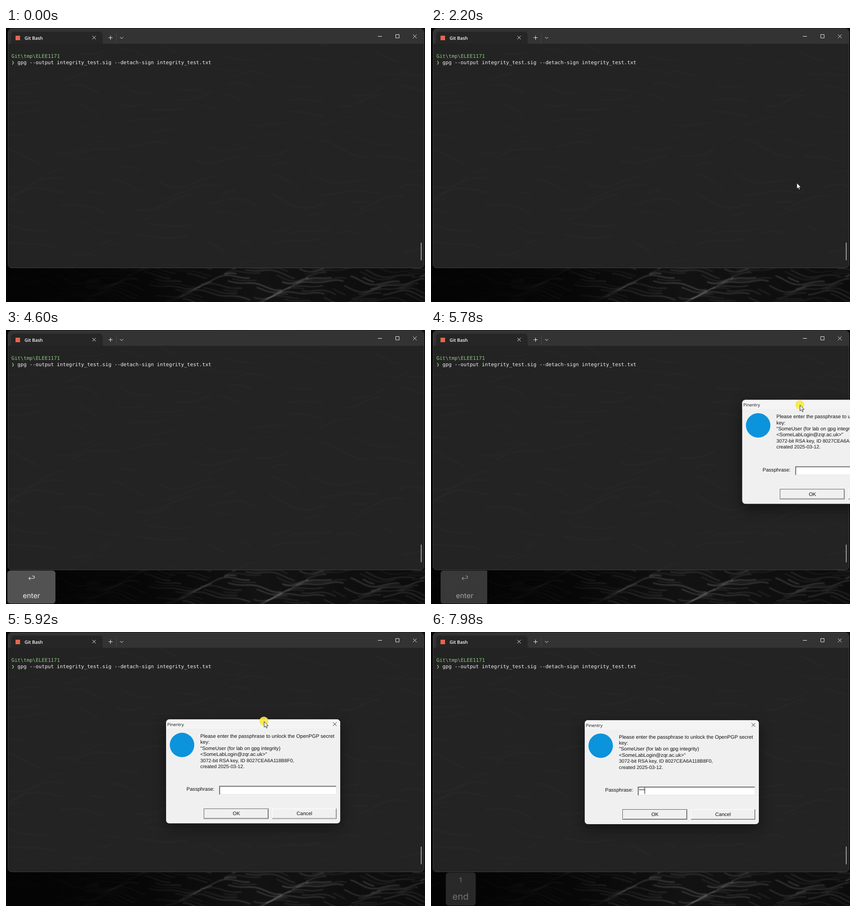
An HTML page for the animation above (8000 ms loop, 924 by 606 pixels).

```html
<!DOCTYPE html>
<html lang="en">
<head>
<meta charset="utf-8">
<title>Signing a file</title>
<style>
  html, body { margin: 0; width: 100%; height: 100%; overflow: hidden; background: #000; }
  svg { display: block; width: 100%; height: 100%; }
  text { white-space: pre; text-rendering: geometricPrecision; }
  .mono { font: 11.1px "DejaVu Sans Mono", monospace; }
  .ui { font-family: "Open Sans", sans-serif; }
  .form { font-family: "Liberation Sans", sans-serif; font-size: 11.1px; fill: #111; }
  .key { font-family: Inter, sans-serif; fill: #f0f0f0; text-anchor: middle; }
  .icon { fill: none; stroke: #f2f2f2; }
  #dialog { filter: drop-shadow(0 10px 14px rgba(0, 0, 0, .45)); }
</style>
</head>
<body>
<svg viewBox="0 0 924 606" xmlns="http://www.w3.org/2000/svg">
  <defs>
    <linearGradient id="sea">
      <stop offset="0" stop-color="#030303"/>
      <stop offset=".35" stop-color="#070707"/>
      <stop offset=".6" stop-color="#121212"/>
      <stop offset="1" stop-color="#0c0c0c"/>
    </linearGradient>
    <linearGradient id="foam" gradientUnits="userSpaceOnUse" x1="0" y1="0" x2="924" y2="0">
      <stop offset=".1" stop-color="#fff" stop-opacity=".05"/>
      <stop offset=".35" stop-color="#fff" stop-opacity=".25"/>
      <stop offset=".6" stop-color="#fff"/>
      <stop offset="1" stop-color="#fff" stop-opacity=".7"/>
    </linearGradient>
    <filter id="soft" filterUnits="userSpaceOnUse" x="0" y="0" width="924" height="606">
      <feGaussianBlur stdDeviation="1.1"/>
    </filter>
    <clipPath id="pane"><rect x="5" y="36" width="916" height="494" rx="6"/></clipPath>
    <clipPath id="enterClip"><rect x="0" y="531" width="124" height="75"/></clipPath>
    <clipPath id="endClip"><rect x="0" y="531" width="99" height="75"/></clipPath>
  </defs>

  <rect width="924" height="606" fill="url(#sea)"/>
  <g id="waves" fill="none" stroke="url(#foam)" filter="url(#soft)"/>

  <rect x="4.5" y="1.5" width="917" height="529" rx="7.5" fill="#232323" stroke="#404040"/>
  <path d="M5 35V9a7 7 0 0 1 7-7H914a7 7 0 0 1 7 7V35Z" fill="#333"/>
  <path d="M7 35q4 0 4-4V15a7 7 0 0 1 7-7H206a7 7 0 0 1 7 7V31q0 4 4 4Z" fill="#262626"/>
  <g clip-path="url(#pane)">
    <g id="haze" fill="none" stroke="#fff" filter="url(#soft)"/>
  </g>

  <rect x="21" y="17" width="10" height="10" fill="#e8654f"/>
  <text class="ui" x="41" y="25.7" font-size="10" font-weight="600" fill="#fff">Git Bash</text>
  <path class="icon" d="M190.500 17.500l7.500 7.500m0-7.500l-7.500 7.500M226 21.500h9M230.500 17v9M251.500 20l3.500 3.500l3.500-3.500"/>
  <path d="M243.500 11V32" stroke="#484848"/>
  <path class="icon" d="M820 18.500h9M859.500 14.500h7.500v7.500h-7.500zM897.500 14.500l8 8m0-8l-8 8"/>

  <text class="mono" x="12" y="66" fill="#8fc97f">Git\tmp\ELEE1171</text>
  <text class="mono" x="12" y="79.500" fill="#8fc97f">❯</text>
  <text class="mono" x="25.300" y="79.500" fill="#f2f2f2">gpg --output integrity_test.sig --detach-sign integrity_test.txt</text>
  <rect id="termCaret" width="1" height="14" fill="#eee"/>
  <rect id="thumb" y="474.500" height="39.500" rx="1" fill="#b4b4b4"/>

  <g id="dialog">
    <rect width="384" height="230" rx="7" fill="#f0f0f0"/>
    <path d="M0 21V7a7 7 0 0 1 7-7H377a7 7 0 0 1 7 7V21Z" fill="#f4f4f4"/>
    <text class="ui" x="2.500" y="14.500" font-size="9.400" fill="#111">Pinentry</text>
    <path d="M368 6.500l8 8m0-8l-8 8" stroke="#222" fill="none"/>
    <circle cx="35.200" cy="56.500" r="27" fill="#0b93dc"/>
    <g id="message" class="form"></g>
    <text class="form" x="45" y="158" font-size="11.400">Passphrase:</text>
    <rect x="117" y="147" width="258" height="19" fill="#fff"/>
    <path d="M118 166V148H375" fill="none" stroke="#6c6c6c" stroke-width="2"/>
    <path d="M119 165.500H375.500V148" fill="none" stroke="#e2e2e2"/>
    <text id="stars" class="form" x="120" y="159" style="font-size:10.300px"></text>
    <rect id="fieldCaret" y="149" width="1" height="14" fill="#000"/>
    <rect x="83.500" y="197.500" width="142" height="22" fill="#f0f0f0" stroke="#5c5c5c"/>
    <path d="M85 218.500H224.500V199" fill="none" stroke="#858585"/>
    <path d="M234.500 219V197.500H375" fill="none" stroke="#fff"/>
    <path d="M234 219.500H375.500V197" fill="none" stroke="#666"/>
    <path d="M235 218.500H374.500V198" fill="none" stroke="#b4b4b4"/>
    <text class="form" x="155" y="212" text-anchor="middle">OK</text>
    <text class="form" x="305" y="212" text-anchor="middle">Cancel</text>
  </g>

  <g clip-path="url(#enterClip)">
    <g id="enterKey">
      <rect y="532" width="106" height="73" rx="6" fill="#525252"/>
      <path d="M47.500 549.500h9.500a2.700 2.700 0 0 0 0-5.400h-2M50.500 546.300l-3.200 3.200l3.200 3.200" fill="none" stroke="#e4e4e4" stroke-width="1.200"/>
      <text class="key" x="53" y="593" font-size="15.600">enter</text>
    </g>
  </g>
  <g clip-path="url(#endClip)">
    <g id="endKey">
      <rect y="532" width="66" height="73" rx="6" fill="#525252"/>
      <text class="key" x="32.500" y="553.500" font-size="15">1</text>
      <text class="key" x="32.500" y="592" font-size="20">end</text>
    </g>
  </g>

  <g id="pointer">
    <circle id="press" r="10" fill="#f7ea45" opacity=".9"/>
    <path d="M.5 .7V13.600L3.500 10.800L5.600 15.500L7.600 14.600L5.600 10H9.600Z" fill="#fff" stroke="#111" stroke-width=".9"/>
  </g>
</svg>

<script>
const LOOP = 8000;
const $ = id => document.getElementById(id);
const make = (tag, parent, attrs) => {
  const el = document.createElementNS('http://www.w3.org/2000/svg', tag);
  for (const k in attrs) el.setAttribute(k, attrs[k]);
  return parent.appendChild(el);
};
const show = (id, on) => $(id).setAttribute('visibility', on ? 'visible' : 'hidden');
const move = (id, x, y) => $(id).setAttribute('transform', `translate(${x} ${y})`);
const within = (t, a, b) => t >= a && t < b;

let seed = 11;
const rnd = () => (seed = seed * 16807 % 2147483647) / 2147483647;

// Broken, rippling crest lines of the dark sea
function crest(parent, y, amp, len, phase, alpha) {
  let d = '';
  for (let x = 0; x <= 924; x += 6) {
    const py = y + amp * Math.sin(x / len + phase) + amp * .45 * Math.sin(x / len * 2.3 + phase * 1.7);
    d += (x ? 'L' : 'M') + x + ' ' + py.toFixed(1);
  }
  const dash = [0, 0, 0, 0].map(() => (25 + 110 * rnd()).toFixed(0)).join(' ');
  make('path', parent, { d, 'stroke-dasharray': dash, 'stroke-width': 1 + 2 * rnd(), 'stroke-opacity': alpha });
}
for (let i = 0; i < 19; i++) crest($('waves'), 522 + i * 5, 9, 34, i * .32, .1 + .13 * rnd());
for (let i = 0; i < 20; i++) crest($('haze'), 50 + i * 25, 20, 62, i * .7, .012 + .014 * rnd());

// Text and font size of each line
[
  ['Please enter the passphrase to unlock the OpenPGP secret', 11.16],
  ['key:', 11],
  ['"SomeUser (for lab on gpg integrity)', 11.1],
  ['<SomeLabLogin@zqr.ac.uk>"', 11.1],
  ['3072-bit RSA key, ID 8027CEA6A118B8F0,', 10.75],
  ['created 2025-03-12.', 10.8]
].forEach(([line, size], i) => {
  make('text', $('message'), { x: 75.5, y: 40.6 + i * 13.4, style: `font-size:${size}px` }).textContent = line;
});

// Rows are [time, x, y]
const roam = [
  [370, 892, 585], [490, 820, 453], [630, 820, 453], [720, 827, 430], [900, 827, 430],
  [1120, 911, 445], [1440, 911, 445], [1680, 890, 351], [1980, 890, 351], [2060, 802, 342],
  [2170, 802, 342], [2200, 806, 342], [2560, 912, 400]
];
const drag = [
  [5720, 1040, 139], [5780, 817, 165], [5840, 594, 191], [5900, 570, 197], [6000, 564, 198],
  [6180, 564, 198], [6290, 602, 212], [6400, 620, 248], [6520, 606, 295], [6650, 580, 322]
];
const pull = [
  [5700, 1070, 127], [5740, 880, 141], [5780, 691, 154], [5840, 406, 185], [5900, 356, 193], [6020, 339, 195]
];

function at(t, rows) {
  const i = rows.findIndex(r => r[0] > t);
  if (i < 0) return rows[rows.length - 1].slice(1);
  if (!i) return rows[0].slice(1);
  const a = rows[i - 1], b = rows[i], p = (t - a[0]) / (b[0] - a[0]);
  return [a[1] + (b[1] - a[1]) * p, a[2] + (b[2] - a[2]) * p];
}

const clamp = v => Math.max(0, Math.min(1, v));
const arrive = (t, start, dur) => 1 - (1 - clamp((t - start) / dur)) ** 3;
const leave = (t, start, dur) => 1 - clamp((t - start) / dur) ** 1.5;

function keycap(id, shown) {
  show(id, shown > 0);
  $(id).setAttribute('opacity', shown);
  move(id, 3 + 55.5 * (1 - shown), 0);
}

function draw(t) {
  const roaming = within(t, 370, 2560), dragging = within(t, 5720, 7330);
  show('pointer', roaming || dragging);
  move('pointer', ...at(t, roaming ? roam : drag));
  show('press', within(t, 5720, 6200));

  show('dialog', t >= 5700);
  move('dialog', ...at(t, pull));

  const entered = t >= 3600;
  show('termCaret', within(t, 2360, 2880) || within(t, 3400, 3900));
  move('termCaret', entered ? 12 : 453, entered ? 82 : 68);

  const wide = within(t, 1090, 1650) || within(t, 2500, 3100);
  $('thumb').setAttribute('x', wide ? 914 : 914.8);
  $('thumb').setAttribute('width', wide ? 3 : 1.7);

  const typed = [7330, 7570, 7780].filter(s => t >= s).length;
  $('stars').textContent = '*'.repeat(typed);
  $('fieldCaret').setAttribute('x', 120 + 4 * typed);
  show('fieldCaret', within(t, 6000, 6530) || t >= 7060);

  keycap('enterKey', t < 5660 ? arrive(t, 4155, 440) : leave(t, 5660, 255));
  keycap('endKey', arrive(t, 7915, 350));
}

function tick() {
  draw(performance.now() % LOOP);
  requestAnimationFrame(tick);
}
tick();
</script>
</body>
</html>
```
